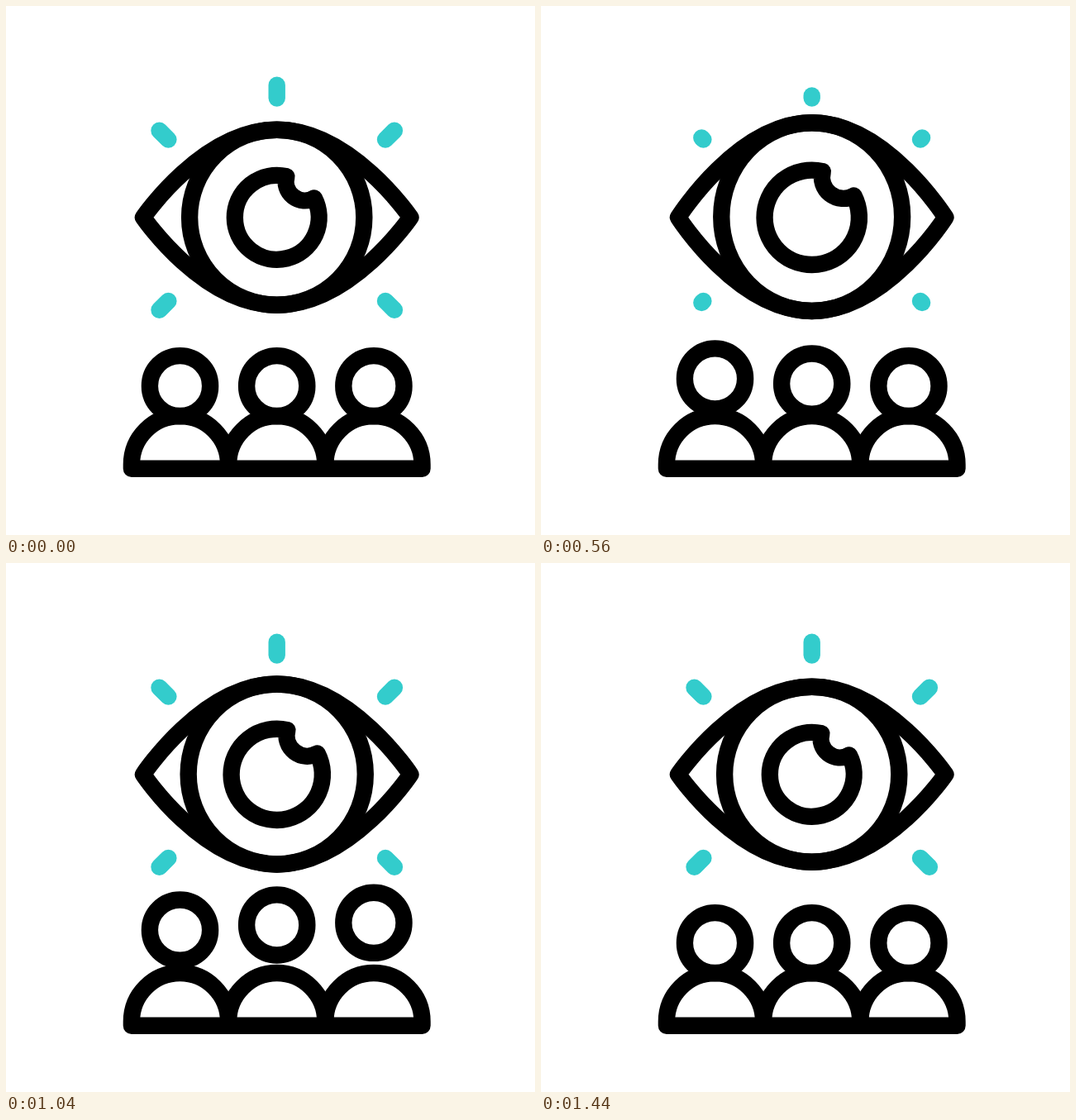
An HTML page with a canvas for the animation above (1480 ms loop, 640x640 px).

```html
<!DOCTYPE html>
<html lang="en">
<head>
<meta charset="utf-8">
<title>Eye over audience</title>
<style>
  html, body { margin: 0; width: 100%; height: 100%; overflow: hidden; background: #fff; }
  canvas { display: block; }
</style>
</head>
<body>
<canvas id="stage" width="640" height="640"></canvas>
<script>
const ctx = document.getElementById('stage').getContext('2d');
const LOOP = 1480, STEP = 40;
const CX = 327.7, CY = 255.8;
const BLACK = '#000', TEAL = '#33cccc';

// Outer and inner end of each ray
const RAYS = [
  [CX, 95.8, CX, 111.6],
  [185.5, 150.7, 196.4, 161.6],
  [469.9, 150.7, 459, 161.6],
  [185.5, 367.8, 196.4, 356.9],
  [469.9, 367.8, 459, 356.9]
];

const mix = (a, b, k) => a + (b - a) * k;

function ease(t, start, duration) {
  const p = Math.min(1, Math.max(0, (t - start) / duration));
  return p * p * (3 - 2 * p);
}

// Rise to 1, hold briefly, fall back to 0
const pulse = (t, start) => ease(t, start, 400) - ease(t, start + 480, 400);

function stroke(path, color = BLACK) {
  ctx.strokeStyle = color;
  ctx.stroke(new Path2D(path));
}

function circle(x, y, rx, ry = rx) {
  ctx.strokeStyle = BLACK;
  ctx.beginPath();
  ctx.ellipse(x, y, rx, ry, 0, 0, Math.PI * 2);
  ctx.stroke();
}

// Rays shrink towards their outer end, then grow back from the inner end
function drawRays(t) {
  const shrinking = t < 450;
  const from = shrinking ? 0 : 1 - ease(t, 470, 320);
  const to = shrinking ? 1 - ease(t, 65, 360) : 1;
  if (to - from < 0.001) return;
  for (const [x0, y0, x1, y1] of RAYS) {
    stroke(`M${mix(x0, x1, from)} ${mix(y0, y1, from)}L${mix(x0, x1, to)} ${mix(y0, y1, to)}`, TEAL);
  }
}

function drawEye(t) {
  const open = pulse(t, 298);
  const top = 149.7 - 11.7 * open, bottom = 361.7 + 10 * open;
  stroke(`M166 ${CY}C166 ${CY} 238 ${top} ${CX} ${top}S489.4 ${CY} 489.4 ${CY}` +
    `S417.4 ${bottom} ${CX} ${bottom}S166 ${CY} 166 ${CY}Z`);
  circle(CX, (top + bottom) / 2, 105.6 + 5.3 * open, (bottom - top) / 2);

  const scale = 1 + 0.207 * pulse(t, 334);
  const at = (x, y) => `${CX + x * scale} ${CY + y * scale}`;
  const r = 50.9 * scale, notch = 23 * scale;
  stroke(`M${at(11.7, -49.5)}A${r} ${r} 0 1 0 ${at(45.2, -23.4)}` +
    `A${notch} ${notch} 0 0 1 ${at(11.7, -49.5)}Z`);
}

function drawPerson(t, i) {
  const x = 210.5 + 117.2 * i;
  circle(x, 459.7 - 24.4 * pulse(t, 398 + 80 * i), 36.6);
  stroke(`M${x - 58.6} 559.7v-5.1a58.6 58.6 0 0 1 117.2 0v5.1Z`);
}

function draw(now) {
  const t = Math.floor(now % LOOP / STEP) * STEP;
  ctx.fillStyle = '#fff';
  ctx.fillRect(0, 0, 640, 640);
  ctx.lineWidth = 20.4;
  ctx.lineCap = ctx.lineJoin = 'round';
  drawRays(t);
  drawEye(t);
  for (let i = 0; i < 3; i++) drawPerson(t, i);
  requestAnimationFrame(draw);
}

draw(0);
</script>
</body>
</html>
```
